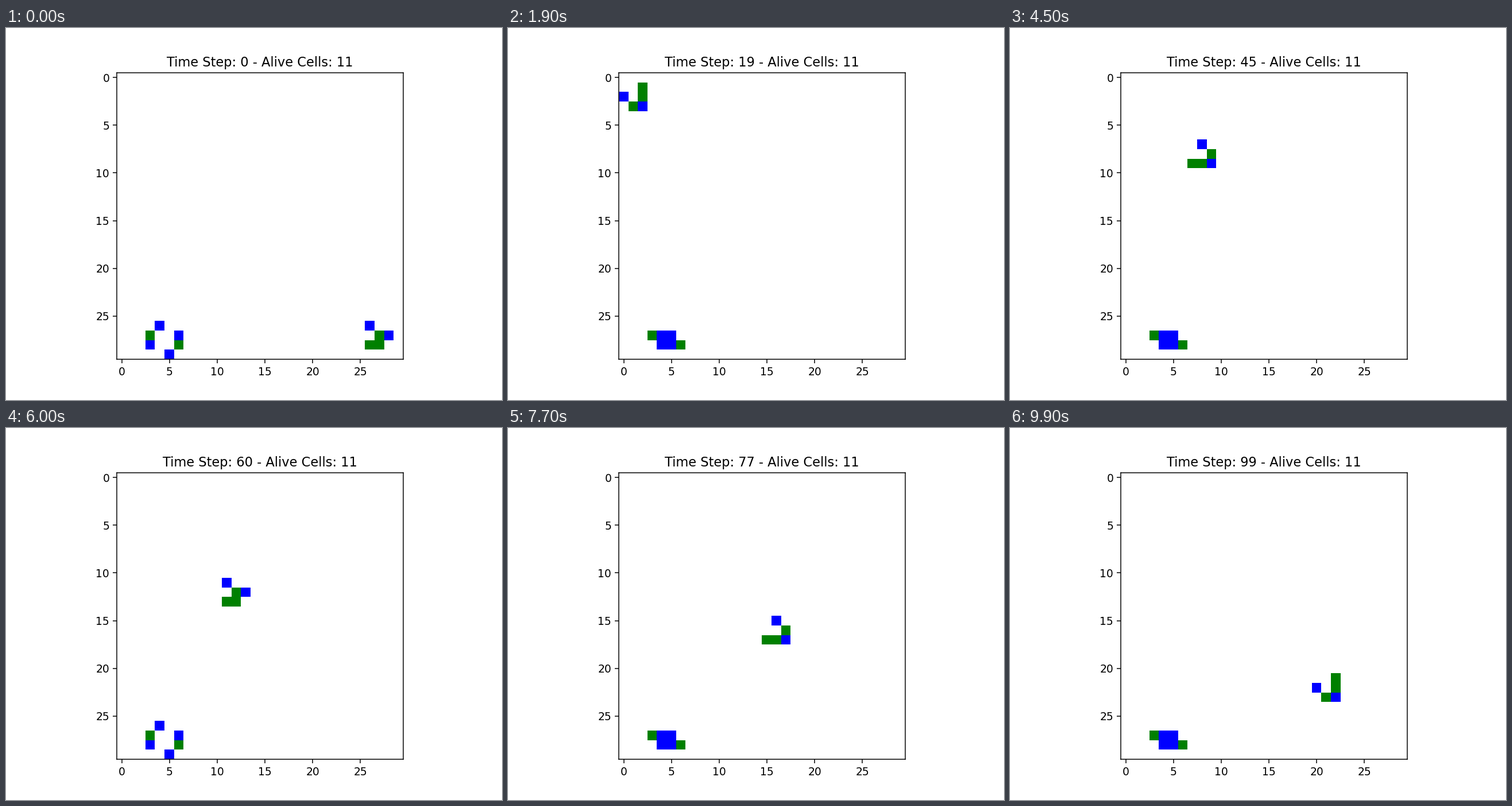
Write a matplotlib script that moves like this. It is 864 by 648 pixels and loops after 10 s.

```python
import matplotlib.pyplot as plt
import numpy as np
from matplotlib.animation import FuncAnimation
from matplotlib.colors import ListedColormap

SIZE = 30
STEPS = 100
DEAD, SURVIVED, BORN = 0, 1, 2

START = {
    SURVIVED: [(27, 3), (28, 6), (27, 27), (28, 26), (28, 27)],
    BORN: [(26, 4), (28, 3), (27, 6), (29, 5), (26, 26), (27, 28)],
}


def first_grid():
    grid = np.full((SIZE, SIZE), DEAD)
    for state, cells in START.items():
        for cell in cells:
            grid[cell] = state
    return grid


def evolve(grid):
    """One Game of Life step on a torus, marking survivors and births."""
    alive = grid != DEAD
    near = sum(
        np.roll(alive.astype(int), (dy, dx), axis=(0, 1))
        for dy in (-1, 0, 1)
        for dx in (-1, 0, 1)
        if dy or dx
    )
    survived = alive & ((near == 2) | (near == 3))
    born = ~alive & (near == 3)
    return np.where(survived, SURVIVED, np.where(born, BORN, DEAD))


history = [first_grid()]
while len(history) < STEPS:
    history.append(evolve(history[-1]))

plt.rcParams["font.family"] = "DejaVu Sans"
fig, ax = plt.subplots(figsize=(6.4, 4.8), dpi=135)
image = ax.imshow(
    history[0],
    cmap=ListedColormap(["white", "green", "blue"]),
    vmin=DEAD,
    vmax=BORN,
    interpolation="nearest",
)
title = ax.set_title("")


def draw(step):
    grid = history[step]
    image.set_data(grid)
    title.set_text(f"Time Step: {step} - Alive Cells: {np.count_nonzero(grid)}")
    return image, title


anim = FuncAnimation(fig, draw, frames=STEPS, interval=100, repeat=True, repeat_delay=0)
plt.show()
```
